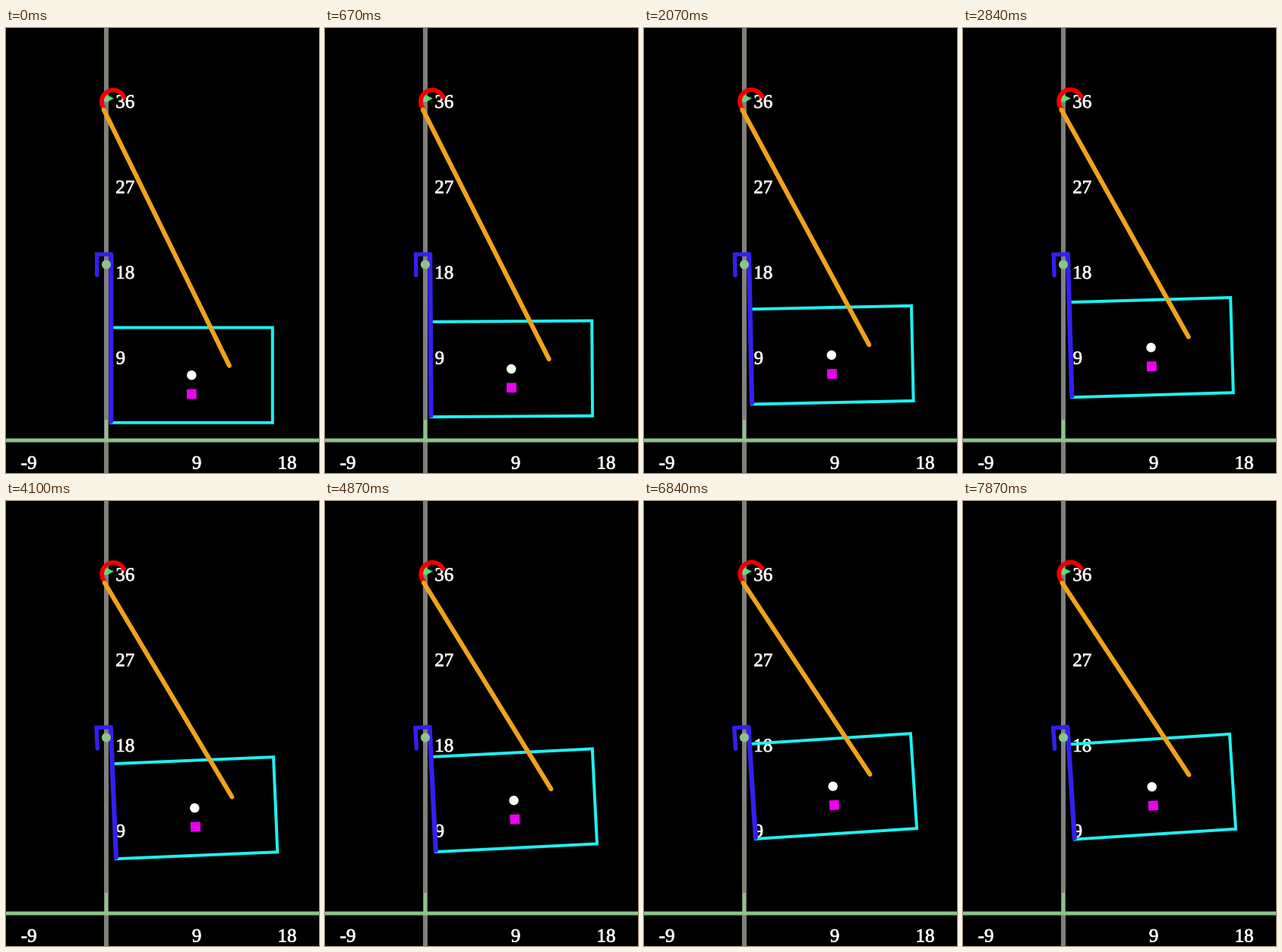
A matplotlib script that plays this animation: 412x586 px, repeating every 7.9 s.

```python
import numpy as np
import matplotlib.pyplot as plt
from matplotlib import patheffects
from matplotlib.animation import FuncAnimation

W, H, DPI = 412, 586, 100
PX = 72 / DPI            # points per pixel
LOOP, FRAMES = 7900, 237

plt.rcParams["path.snap"] = False

GREEN, WHITE, BLUE = "#8cc48a", "#fafaf6", "#3320ee"
TOP = np.array([132, 93])        # cable pivot
MID = np.array([132, 311.5])     # post pivot

# Shapes relative to their pivots, in the starting pose
HOOK = np.array([(-12.3, 14), (-12.3, -13.5), (6.3, -13.5)])
FOOT = np.array([(6.3, 206.5)])
BOX = np.array([(6.3, 83), (218.8, 83), (218.8, 208.2), (6.3, 208.2)])
DOT = np.array([(112.3, 145.7)])
SQUARE = np.array([(112.4, 170.5)]) + 6.4 * np.array([(-1, -1), (1, -1), (1, 1), (-1, 1)])
TIP = np.array([(162, 133.2)])
CABLE = np.array([(-3.3, 14.5)])
a = np.radians(np.linspace(147, 338, 40))
ARC = np.c_[9.2 + 15.3 * np.cos(a), 4 + 15.3 * np.sin(a)]


def turn(pts, ang):
    """Rotate counter-clockwise on a y-down stage."""
    c, s = np.cos(ang), np.sin(ang)
    return pts @ np.array([(c, -s), (s, c)])


def bearing(p):
    d = p - TOP
    return np.arctan2(d[0], d[1])


def lift(ms):
    return np.interp(ms, [30, 6280, 6840, 7870], [0, 73.9, 74.1, 73.5])


fig = plt.figure(figsize=(W / DPI, H / DPI), dpi=DPI, facecolor="black")
ax = fig.add_axes([0, 0, 1, 1])
ax.set(xlim=(0, W), ylim=(H, 0))
ax.axis("off")


def line(color, width, z, pts=((0, 0),), cap="round"):
    x, y = np.transpose(pts)
    return ax.plot(x, y, color=color, lw=width * PX, zorder=z,
                   solid_capstyle=cap, solid_joinstyle="miter")[0]


def disc(center, r, color, z):
    return ax.add_patch(plt.Circle(center, r, color=color, lw=0, zorder=z))


def label(x, y, value):
    stroke = patheffects.withStroke(linewidth=0.7 * PX, foreground=WHITE)
    ax.text(x, y, str(value), color=WHITE, family="Liberation Serif",
            fontsize=25 * PX, ha="center", va="baseline", zorder=3,
            path_effects=[stroke])


# Axes and scale
line("#80807a", 6, 1, [(132, 0), (132, H)], "butt")
line(GREEN, 4, 2, [(132, 516), (132, 543)], "butt")
line(GREEN, 5, 2, [(0, 543), (W, 543)], "butt")
for value, x, base in ((36, 156.8, 105), (27, 156.8, 217.5),
                       (18, 156.8, 330), (9, 150.8, 442.5)):
    label(x, base, value)
for value, x in ((-9, 30), (9, 251), (18, 370)):
    label(x, 580.5, value)

# Pivots
disc(TOP, 4.5, GREEN, 7)
ax.add_patch(plt.Polygon([(133, 88.5), (142, 92.7), (133, 97.5)],
                         color="#50e070", lw=0, zorder=8))
disc(MID, 6, GREEN, 7)

# Moving parts
box = line("#1ef0f0", 4, 4)
post = line(BLUE, 6.2, 5)
hook = line(BLUE, 5.4, 5)
dot = disc((0, 0), 6.2, "#fffffa", 6)
square = ax.add_patch(plt.Polygon(SQUARE, color="#ec00f0", lw=0, zorder=6))
cable = line("#f0a31c", 6, 9)
arc = line("#f00000", 5.8, 8)
moving = [box, post, hook, dot, square, cable, arc]


def draw(i):
    d = lift(i * LOOP / FRAMES)
    tilt = np.radians(0.05 * d)

    def slide(pts):
        return MID + turn(pts - (0, d), tilt)

    box.set_data(*slide(BOX[[0, 1, 2, 3, 0]]).T)
    crook = MID + turn(HOOK, tilt)
    hook.set_data(*crook.T)
    post.set_data(*np.vstack([crook[-1], slide(FOOT)]).T)
    dot.center = slide(DOT)[0]
    square.set_xy(slide(SQUARE))

    tip = slide(TIP)[0]
    swing = bearing(tip) - bearing(MID + TIP[0])
    cable.set_data(*np.vstack([TOP + turn(CABLE, swing), tip]).T)
    arc.set_data(*(TOP + turn(ARC, swing)).T)
    return moving


anim = FuncAnimation(fig, draw, frames=FRAMES, interval=LOOP / FRAMES,
                     repeat=True, repeat_delay=0, blit=False)
plt.show()
```
